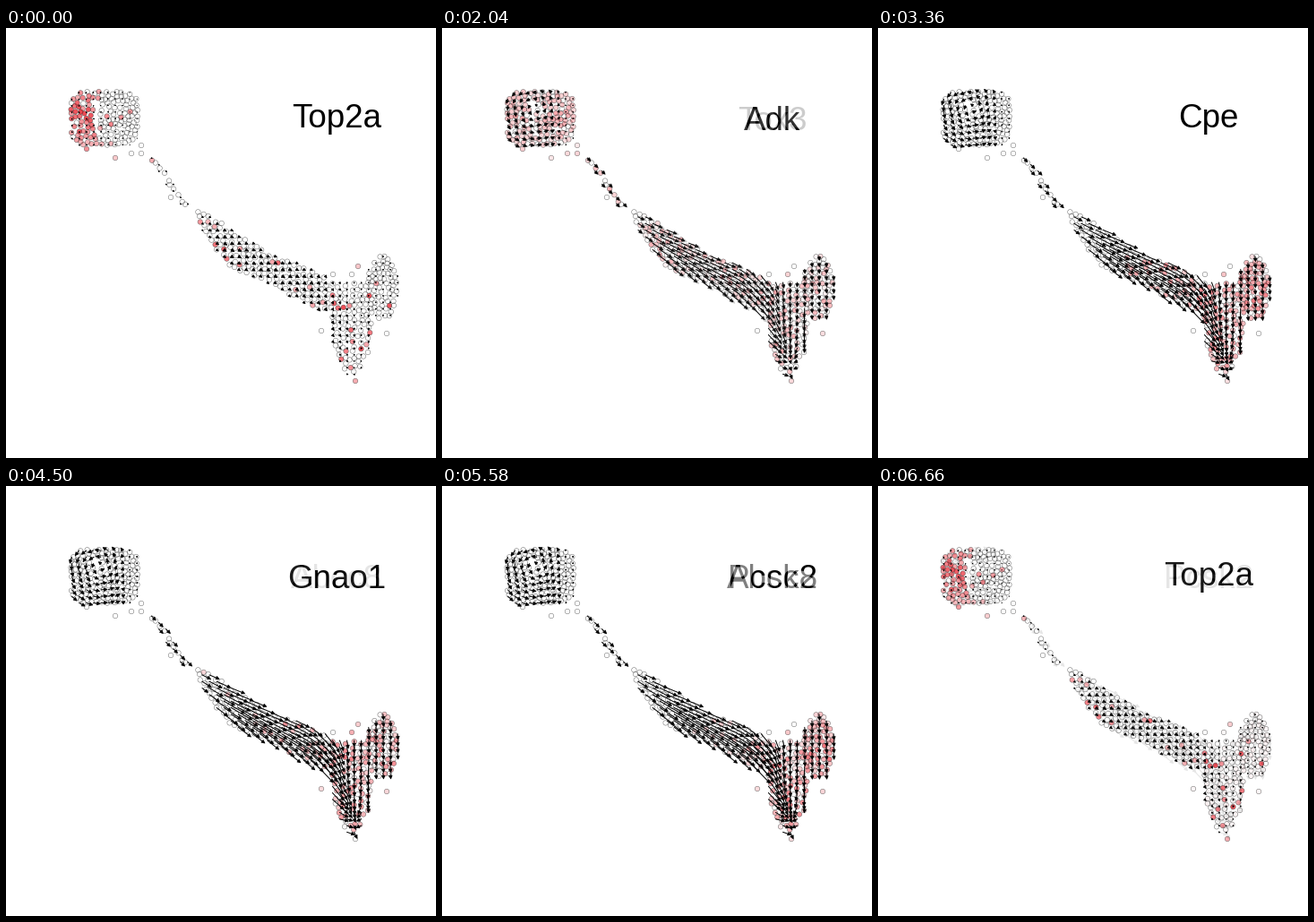
These frames come from a looping animation (480 px wide and 480 px high, 6.72 s). A matplotlib script:

```python
import numpy as np
import matplotlib.pyplot as plt
from matplotlib.animation import FuncAnimation
from matplotlib.collections import LineCollection, PolyCollection

SIZE, DPI = 480, 96
PX = 72 / DPI
STEP_MS, HOLD, FADE = 60, 5, 9
SPAN = HOLD + FADE
RED = (0.91, 0.02, 0.07)
SINK = np.array([390, 374])
rng = np.random.default_rng(12)

# Cells away from the main cloud
STRAYS = [(90, 135), (101, 129), (122, 145), (140, 140), (151, 131),
          (151, 140), (184, 189), (216, 210), (365, 275), (386, 275),
          (393, 266), (352, 338), (425, 341), (390, 394), (404, 362)]

# Cells share the expression rate of the nearest centre
CENTRES = np.array([(85, 101), (126, 99), (184, 172), (245, 240),
                    (310, 270), (372, 305), (387, 350), (421, 298)])

# Gene, depth of colour, share of lit cells around each centre
SCENES = [
    ("Top2a", 1.00, (0.85, 0.06, 0.12, 0.15, 0.04, 0.06, 0.25, 0.04)),
    ("Nfib", 0.75, (0.55, 0.70, 0.70, 0.30, 0.10, 0.12, 0.10, 0.05)),
    ("Adk", 0.55, (0.75, 0.85, 0.70, 0.50, 0.35, 0.40, 0.40, 0.45)),
    ("Tox3", 0.50, (0, 0.10, 0.20, 0.40, 0.45, 0.35, 0.35, 0.35)),
    ("Cpe", 0.70, (0, 0, 0, 0, 0.30, 0.70, 0.85, 0.85)),
    ("Gnao1", 0.70, (0, 0, 0, 0.02, 0.25, 0.50, 0.60, 0.60)),
    ("Abcc8", 0.70, (0, 0, 0, 0, 0.10, 0.50, 0.65, 0.65)),
    ("Pcsk2", 0.90, (0, 0, 0, 0, 0, 0.45, 0.85, 0.75)),
]


def spine(x):
    """Centre line and half width of the diagonal band."""
    mid = np.interp(x, [214, 250, 290, 354], [211, 246, 266, 297])
    half = np.interp(x, [212, 240, 262, 290, 320], [7, 20, 21, 16, 20])
    return mid, half


def inside(pts, pad):
    """Points in the cloud: block, band, wedge and oval, widened by pad."""
    x, y = np.asarray(pts, float).T
    block = abs((x - 110) / (38.5 + pad)) ** 5 + abs((y - 101) / (31 + pad)) ** 5 < 1
    mid, half = spine(x)
    band = (x > 213 - pad) & (x < 360) & (abs(y - mid) < half + pad)
    width = np.interp(y, [284, 310, 350, 388], [27, 25, 21, 7]) + pad
    wedge = (y > 284 - pad) & (y < 386 + pad) & (abs(x - 386) < width)
    oval = np.hypot((x - 420) / (17.5 + pad), (y - 290) / (36.5 + pad)) < 1
    return block | band | wedge | oval


def make_cells():
    t = np.linspace(0, 1, 10)
    chain = np.column_stack([164 + 37 * t, 146 + 52 * t])
    chain += rng.uniform(-2, 2, chain.shape)
    cells = list(chain) + list(np.array(STRAYS, float))
    tries = rng.uniform((70, 68), (440, 390), (40000, 2))
    for p in tries[inside(tries, -1)]:
        if abs(p[0] - 101) < 4 and 82 < p[1] < 118:
            continue
        gap = 4.2 if p[0] < 155 or p[0] > 405 else 4.9
        if np.min(np.hypot(*(np.array(cells) - p).T)) > gap:
            cells.append(p)
    return np.array(cells), chain


def make_grid(chain):
    xs = 73.5 + 8.08 * np.arange(46)
    ys = 72 + 7.31 * np.arange(44)
    pts = np.array([(x, y) for y in ys for x in xs])
    near = np.min(np.hypot(*(pts[:, None] - chain).T), axis=0) < 4.6
    return pts[inside(pts, 1) | near]


def polar(angle, length):
    a = np.radians(angle)
    return np.array([np.cos(a), np.sin(a)]) * length


def flow(p):
    """Arrow vector at full strength."""
    x, y = p
    if x < 155:  # slow whirl
        v = np.array([y - 93, 101 - x]) + (4, 3)
        return v / (np.hypot(*v) + 5) * 8.5 * np.clip((142 - x) / 26, 0.15, 1)
    if x < 212:
        return polar(45, 7)
    if x > 411 or (x > 397 and y < 312):
        return polar(85, 6.5)
    if x > 398:
        return polar(93, np.clip((372 - y) / 2, 3, 14))
    mid, half = spine(x)
    off = np.clip((y - mid) / half, -1, 1)
    to_sink = SINK - p
    aim = np.degrees(np.arctan2(max(to_sink[1], 3), to_sink[0]))
    pull = np.clip((x - 315) / 70, 0, 1)
    if x < 345:
        length = min(10 + (x - 214) * 0.7, 28) * (1 - 0.4 * abs(off))
    else:
        length = np.clip(25 - (x - 345) * 0.4 + (y - 300) * 0.1, 7, 25)
        length = min(length, 3 + np.hypot(*to_sink) * 0.4)
    angle = 30 + 8 * off
    return polar(angle + (aim - angle) * pull, length)


cells, chain = make_cells()
grid = make_grid(chain)
field = np.array([flow(p) for p in grid])

far = np.hypot(*(cells[:, None] - CENTRES).T).T
group = np.argmin(far, axis=1)
glow = np.clip(1.2 - np.min(far, axis=1) / 60, 0.5, 1.1)


def expression(depth, shares):
    lit = rng.random(len(cells)) < np.array(shares)[group]
    value = depth * glow * rng.uniform(0.5, 1, len(cells))
    return np.where(lit, np.clip(value, 0, 1), 0)


def draw_arrows(ax, strength):
    vec = field * strength
    size = np.hypot(*vec.T)[:, None]
    unit = vec / np.maximum(size, 1e-6)
    side = unit[:, ::-1] * (-1, 1)
    head = np.minimum(size, 3.6)
    tip = grid + vec
    base = tip - unit * head
    heads = np.stack([tip, base + side * head * 0.5, base - side * head * 0.5], axis=1)
    ax.add_collection(LineCollection(
        np.stack([grid, tip - unit * head * 0.4], axis=1), colors="black",
        linewidths=PX, capstyle="round", zorder=3))
    ax.add_collection(PolyCollection(
        heads, facecolors="black", edgecolors="black", linewidths=0.7 * PX,
        joinstyle="round", zorder=4))


def render(fig, k):
    name, depth, shares = SCENES[k]
    ax = fig.add_axes([0, 0, 1, 1])
    ax.set(xlim=(0, SIZE), ylim=(SIZE, 0))
    ax.axis("off")
    fill = np.zeros((len(cells), 4))
    fill[:, :3] = RED
    fill[:, 3] = 0.72 * expression(depth, shares)
    ax.scatter(*cells.T, s=(5.5 * PX) ** 2, c=fill,
               edgecolors=(0.25, 0.25, 0.25, 0.65), linewidths=0.6 * PX, zorder=2)
    draw_arrows(ax, 1.1 * (1 - np.exp(-(k + 0.36) / 2.4)))
    base = 111 if "p" in name else 114.5
    ax.text(369, base, name, ha="center", va="baseline",
            family="Liberation Sans", size=36.7 * PX, color="black")
    fig.canvas.draw()
    shot = np.asarray(fig.canvas.buffer_rgba())[..., :3] / 255
    ax.remove()
    return shot


fig = plt.figure(figsize=(SIZE / DPI, SIZE / DPI), dpi=DPI, facecolor="white")
shots = [render(fig, k) for k in range(len(SCENES))]
picture = fig.figimage(shots[0], origin="upper")


def update(frame):
    k, step = divmod(frame, SPAN)
    mix = max(0, step - HOLD + 1) / (FADE + 1)
    after = shots[(k + 1) % len(shots)]
    picture.set_data(shots[k] * (1 - mix) + after * mix)
    return [picture]


anim = FuncAnimation(fig, update, frames=SPAN * len(SCENES),
                     interval=STEP_MS, repeat=True, blit=False)
plt.show()
```
